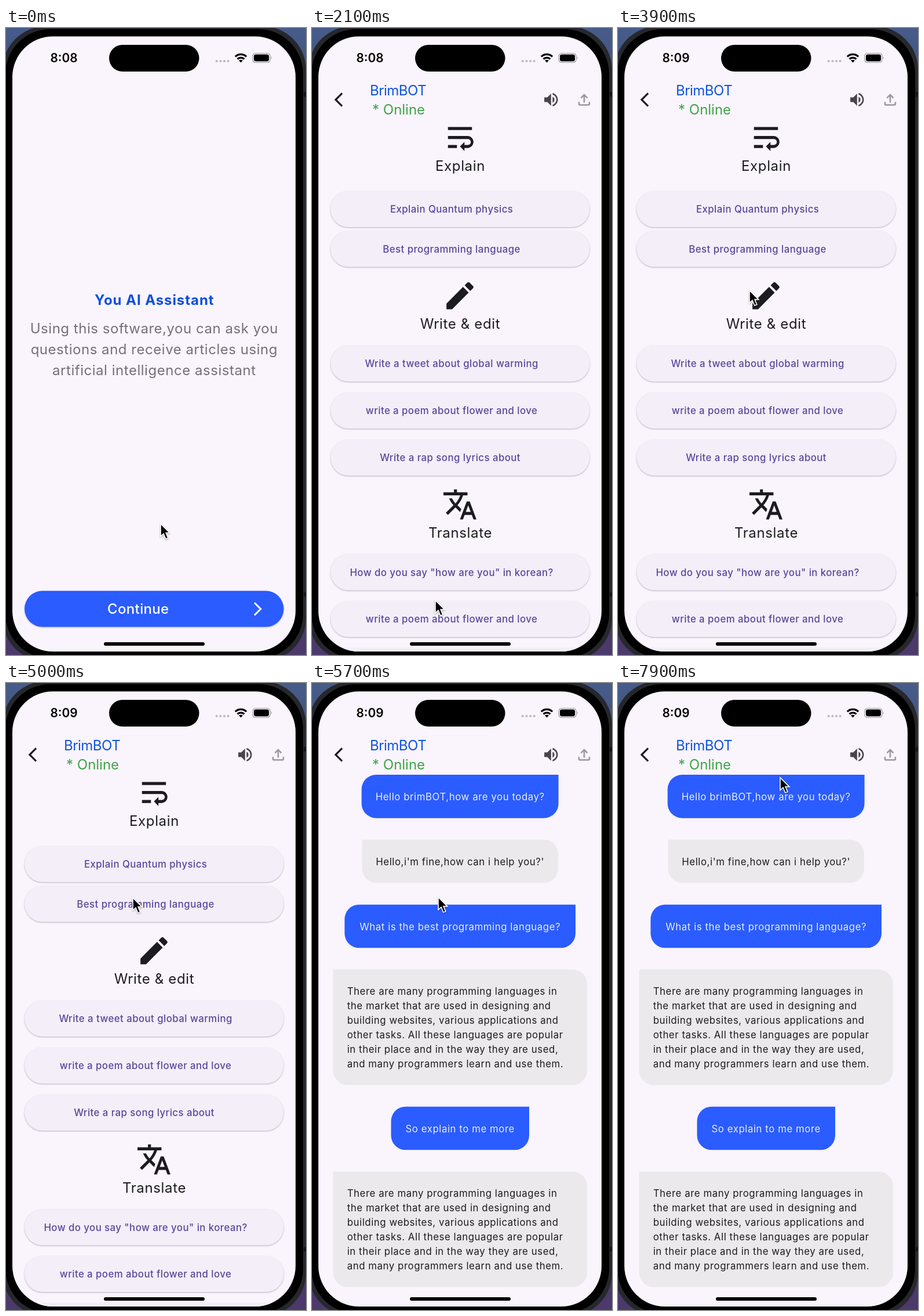
Recreate the animation shown at these times as an HTML page. Size 518x1080 px, loop 8 s.

```html
<!DOCTYPE html>
<html lang="en">
<head>
<meta charset="utf-8">
<title>Assistant app</title>
<style>
html, body { margin: 0; width: 100%; height: 100%; overflow: hidden; background: #000; }
svg { display: block; width: 518px; height: 1080px; font-family: Inter, "Open Sans", sans-serif; }
.lift { filter: drop-shadow(0 1.6px 1px rgba(40, 30, 60, .32)); }
</style>
</head>
<body>
<svg id="stage" viewBox="0 0 518 1080" xmlns="http://www.w3.org/2000/svg">
  <defs>
    <linearGradient id="desk" x1="0" y1="0" x2="0" y2="1">
      <stop offset="0" stop-color="#475c8a"/>
      <stop offset=".5" stop-color="#2a2c42"/>
      <stop offset="1" stop-color="#4c3a6c"/>
    </linearGradient>
    <linearGradient id="edge">
      <stop offset="0" stop-color="#000" stop-opacity="0"/>
      <stop offset="1" stop-color="#000" stop-opacity=".025"/>
    </linearGradient>
    <clipPath id="screen"><rect x="11" y="14.5" width="489" height="1059.5" rx="70"/></clipPath>
  </defs>
  <rect width="518" height="1080" fill="url(#desk)"/>
  <rect x="-6" y="-3" width="524" height="1094" rx="75" fill="#27282c"/>
  <path d="M514 110h4v8h-4zM514 972h4v7h-4z" fill="#141417"/>
  <rect x="-1" y="2" width="514" height="1084" rx="77"/>
  <g id="pages" clip-path="url(#screen)"></g>
  <g id="status">
    <rect x="178" y="29" width="155.5" height="46" rx="23"/>
    <g fill="#bdb8c0">
      <circle cx="363.7" cy="57" r="2.1"/><circle cx="370.4" cy="57" r="2.1"/>
      <circle cx="377" cy="57" r="2.1"/><circle cx="383.6" cy="57" r="2.1"/>
    </g>
    <g fill="none" stroke="#000" stroke-width="3.2">
      <path d="M395.9 49.4a13.6 13.6 0 0 1 19.2 0"/>
      <path d="M399.6 53.5a8.4 8.4 0 0 1 11.8 0"/>
    </g>
    <path d="M405.5 59.6l-3.4-3.5a4.8 4.8 0 0 1 6.8 0z"/>
    <rect x="426" y="43.5" width="30" height="16" rx="5" fill="none" stroke="#9d99a1" stroke-width="1.2"/>
    <rect x="428" y="45.5" width="26" height="12" rx="3.4"/>
    <path d="M457.6 48.8q2.4 2.7 0 5.4z" fill="#9d99a1"/>
    <rect x="169" y="1058" width="174" height="6" rx="3"/>
  </g>
  <g id="ring" fill="none">
    <circle r="33.2" stroke="#fff" stroke-width="1.4"/>
    <circle r="31.8" stroke="#000" stroke-width="2.3"/>
  </g>
  <path id="cursor" d="M0 0V21.6L5 17L8.8 26L12.8 24.4L9.1 15.6H15.8Z" stroke="#fff" stroke-width="1.6"
    style="filter:drop-shadow(0 1.5px 1.2px rgba(0,0,0,.35))"/>
</svg>
<script>
const NS = 'http://www.w3.org/2000/svg';
const W = 489, LEFT = 11, MID = 255.7;
const INK = '#1c1b1f', BLUE = '#2a5cff', PAPER = '#faf4fc';
const $ = id => document.getElementById(id);

function add(parent, tag, attrs, content) {
  const el = document.createElementNS(NS, tag);
  for (const k in attrs) el.setAttribute(k, attrs[k]);
  if (content) el.textContent = content;
  parent.appendChild(el);
  return el;
}

function label(parent, str, x, y, size, fill, gap = 0, weight = 400, anchor = 'middle') {
  return add(parent, 'text', {
    x, y, fill, 'font-size': size, 'font-weight': weight,
    'letter-spacing': gap, 'text-anchor': anchor
  }, str);
}

function icon(parent, d, x, y, scale, fill = INK) {
  add(parent, 'path', { d, fill, transform: `translate(${x} ${y}) scale(${scale})` });
}

function pill(parent, y, fill) {
  return add(parent, 'rect', { x: 32, y, width: 447.5, height: 62, rx: 31, fill, class: 'lift' });
}

function page() {
  const g = add($('pages'), 'g', {});
  add(g, 'rect', { x: LEFT - 24, y: 0, width: 24, height: 1080, fill: 'url(#edge)' });
  add(g, 'rect', { x: LEFT, y: 0, width: W + 1, height: 1080, fill: PAPER });
  return g;
}

function header(g) {
  add(g, 'path', { d: 'M52 112.3L40.8 123.5L52 134.7', fill: 'none', stroke: INK, 'stroke-width': 3.2 });
  label(g, 'BrimBOT', 100, 115.8, 24, '#1054e0', -.5, 400, 'start');
  label(g, '* Online', 104, 148.8, 24, '#3fa548', 0, 400, 'start');
  icon(g, 'M3 9v6h4l5 5V4L7 9H3zm13.5 3c0-1.77-1.02-3.29-2.5-4.03v8.05c1.48-.73 2.5-2.25 2.5-4.02z' +
    'M14 3.23v2.06c2.89.86 5 3.54 5 6.71s-2.11 5.85-5 6.71v2.06c4.01-.91 7-4.49 7-8.77s-2.99-7.86-7-8.77z',
    397.2, 107.9, 1.3, '#47434b');
  icon(g, 'M18 15v3H6v-3H4v3c0 1.1.9 2 2 2h12c1.1 0 2-.9 2-2v-3h-2z' +
    'M7 9l1.41 1.41L11 7.83V16h2V7.83l2.59 2.58L17 9l-5-5-5 5z', 454.6, 108.1, 1.28, '#9b979f');
}

// Welcome page
const home = page();
label(home, 'You AI Assistant', 256.3, 477, 24, '#0b4ee0', .92, 700);
['Using this software,you can ask you',
 'questions and receive articles using',
 'artificial intelligence assistant'].forEach((s, i) =>
  label(home, s, 255.8, 526 + i * 36, 24, '#757078', .53));
pill(home, 969.5, BLUE);
label(home, 'Continue', 228.3, 1009, 24, '#fff', .35, 500);
add(home, 'path', { d: 'M429 990L439.8 1000.7L429 1011.4', fill: 'none', stroke: '#fff', 'stroke-width': 3 });

// Topic page
const menu = page();
header(menu);
const cards = [
  ['Explain Quantum physics', 281], ['Best programming language', 349.5],
  ['Write a tweet about global warming', 547], ['write a poem about flower and love', 628],
  ['Write a rap song lyrics about', 709, 238.6], ['How do you say "how are you" in korean?', 906.5],
  ['write a poem about flower and love', 987], ['', 1068]
].map(([s, y, x = 241.1]) => {
  const box = pill(menu, y, '#f3eef8');
  label(menu, s, x, y + 37.3, 16.8, '#59469a', .45, 500);
  return box;
});
icon(menu, 'M4 19h6v-2H4v2zM20 5H4v2h16V5zm-3 6H4v2h13.25c1.1 0 2 .9 2 2s-.9 2-2 2H15v-2l-3 3 3 3v-2h2' +
  'c2.21 0 4-1.79 4-4s-1.79-4-4-4z', 224.4, 157.5, 2.59);
icon(menu, 'M3 17.25V21h3.75L17.81 9.94l-3.75-3.75L3 17.25zM20.71 7.04c.39-.39.39-1.02 0-1.41l-2.34-2.34' +
  'c-.39-.39-1.02-.39-1.41 0l-1.83 1.83 3.75 3.75 1.83-1.83z', 224.4, 430, 2.59);
icon(menu, 'M12.87 15.07l-2.54-2.51.03-.03c1.74-1.94 2.98-4.17 3.71-6.53H17V4h-7V2H8v2H1v1.99h11.17' +
  'C11.5 7.92 10.44 9.75 9 11.35 8.07 10.32 7.3 9.19 6.69 8h-2c.73 1.63 1.73 3.17 2.98 4.56l-5.09 5.02' +
  'L4 19l5-5 3.11 3.11.76-2.04zM18.5 10h-2L12 22h2l1.12-3h4.75L21 22h2l-4.5-12zm-2.62 7l1.62-4.33L19.12 17h-3.24z',
  224.4, 789.5, 2.59);
[['Explain', 246], ['Write & edit', 518.3], ['Translate', 877.5]].forEach(([s, y]) =>
  label(menu, s, 256, y, 24, INK, .65));

// Chat page
const chat = page();
header(chat);
const R = 25;
function bubble(x, y, w, lines, mine) {
  const h = 49.8 + lines.length * 24.85, a = `a${R} ${R} 0 0 1 `;
  const d = mine
    ? `M${x + R} ${y}H${x + w}V${y + h - R}${a}-${R} ${R}H${x + R}${a}-${R} -${R}V${y + R}${a}${R} -${R}z`
    : `M${x} ${y}H${x + w - R}${a}${R} ${R}V${y + h - R}${a}-${R} ${R}H${x + R}${a}-${R} -${R}z`;
  add(chat, 'path', { d, fill: mine ? BLUE : '#ebe9ec' });
  const one = lines.length === 1;
  lines.forEach((s, i) => label(chat, s, one ? MID : x + 24.2, y + 43.8 + i * 24.85, 16.8,
    mine ? '#e9ebff' : INK, .57, 400, one ? 'middle' : 'start'));
}
const answer = [
  'There are many programming languages in',
  'the market that are used in designing and',
  'building websites, various applications and',
  'other tasks. All these languages are popular',
  'in their place and in the way they are used,',
  'and many programmers learn and use them.'
];
bubble(85.6, 158, 340, ['Hello brimBOT,how are you today?'], true);
bubble(86.5, 269.7, 338.5, ["Hello,i'm fine,how can i help you?'"], false);
bubble(56.3, 381.7, 398.7, ['What is the best programming language?'], true);
bubble(36.5, 493.5, 438.5, answer, false);
bubble(136.5, 729.7, 238.5, ['So explain to me more'], true);
bubble(36.5, 841.5, 438.5, answer, false);

const clock = label($('status'), '8:08', 76.5, 59, 20.8, '#000', 0, 600, 'start');

// Motion
const clamp = v => Math.max(0, Math.min(1, v));
const smooth = u => u * u * (3 - 2 * u);

// Fast start, long settle: cubic-bezier(.35, .91, .33, .97)
function settle(u) {
  if (u <= 0 || u >= 1) return clamp(u);
  const bez = (s, a, b) => 3 * (1 - s) * (1 - s) * s * a + 3 * (1 - s) * s * s * b + s * s * s;
  let lo = 0, hi = 1;
  for (let i = 0; i < 24; i++) {
    const m = (lo + hi) / 2;
    if (bez(m, .35, .33) < u) lo = m; else hi = m;
  }
  return bez(lo, .91, .97);
}

const path = [
  [0, 267, 854], [300, 267, 854], [1100, 213, 988], [1600, 213, 988], [2100, 213, 986],
  [2600, 213, 986], [3700, 227, 452], [4200, 227, 452], [4900, 219, 370],
  [5400, 219, 370], [5700, 218, 369], [6300, 218, 369], [7700, 280, 163], [8000, 280, 163]
];
function pointer(t) {
  let i = 0;
  while (i < path.length - 2 && t >= path[i + 1][0]) i++;
  const [t0, x0, y0] = path[i], [t1, x1, y1] = path[i + 1];
  const k = smooth(clamp((t - t0) / (t1 - t0)));
  return [x0 + (x1 - x0) * k, y0 + (y1 - y0) * k];
}

const within = (t, a, b) => t >= a && t < b;
const show = (el, on) => el.setAttribute('visibility', on ? 'visible' : 'hidden');
const move = (el, x, y = 0) => el.setAttribute('transform', `translate(${x.toFixed(2)} ${y.toFixed(2)})`);
const under = p => -W / 3 * (p - .23 * p * (1 - p));
const SLIDE = 435;

function draw(t) {
  const a = settle((t - 1565) / SLIDE), b = settle((t - 5265) / SLIDE);
  move(home, under(a));
  move(menu, a < 1 ? W * (1 - a) : under(b));
  move(chat, W * (1 - b));
  show(home, a < 1);
  show(menu, a > 0 && b < 1);
  show(chat, b > 0);
  cards[1].setAttribute('fill', within(t, 5100, 5900) ? '#e2dbee' : '#f3eef8');
  clock.textContent = t < 3000 ? '8:08' : '8:09';
  const [x, y] = pointer(t);
  move($('cursor'), x, y);
  move($('ring'), x + .4, y + 1);
  show($('ring'), within(t, 1300, 1500) || within(t, 5050, 5250));
}

function tick() {
  draw(Math.floor(performance.now() % 8000 / 100) * 100);
  requestAnimationFrame(tick);
}
tick();
</script>
</body>
</html>
```
